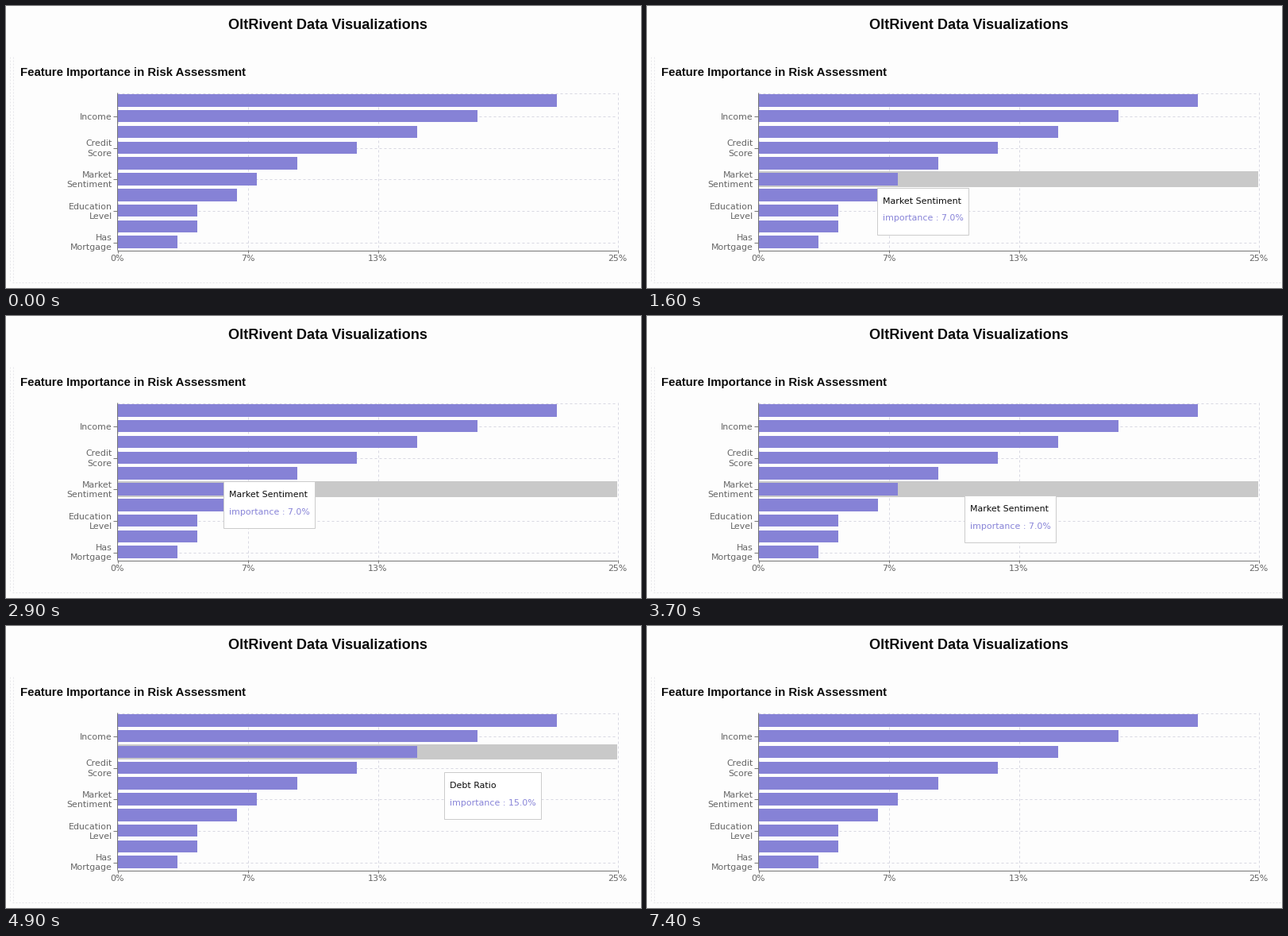
Write a matplotlib script that moves like this. It is 800 by 355 pixels and loops after 7.9 s.

```python
import matplotlib.pyplot as plt
import numpy as np
from matplotlib.animation import FuncAnimation
from matplotlib.patches import Rectangle

W, H, DPI = 800, 355, 100
STEP, FRAMES = 100, 79
LEFT, RIGHT, TOP, BOTTOM = 140, 770, 109, 307
BAND = (BOTTOM - TOP) / 10
TIP_H, LAG = 59, 0.4
SHOW, HIDE = 800, 7400

BG, BAR, CURSOR = "#fdfdfd", "#8682d6", "#c9c9c9"
GRID, BORDER, AXIS = "#d8d8e2", "#e6e6ea", "#777777"
INK, LABEL = "#0b0b0b", "#666666"

FEATURES = {
    "Loan Amount": 22, "Income": 18, "Debt Ratio": 15, "Credit Score": 12,
    "Savings Rate": 9, "Market Sentiment": 7, "Loan Term": 6,
    "Education Level": 4, "Age Group": 4, "Has Mortgage": 3,
}
NAMES = list(FEATURES)

# Pointer path: ms, x, height in rows
POINTER = np.array([
    (800, 460, 1.5), (1000, 440, 1.9), (1100, 319, 7.5), (1700, 243.5, 5.5),
    (2400, 243.5, 5.5), (2500, 249, 7.5), (2800, 265.5, 7.5),
    (2900, 271, 5.9), (4400, 543.5, 4.9), (5200, 543.5, 1.5),
]).T

fig = plt.figure(figsize=(W / DPI, H / DPI), dpi=DPI, facecolor=BG)
ax = fig.add_axes([0, 0, 1, 1])
ax.set_xlim(0, W)
ax.set_ylim(H, 0)
ax.axis("off")


def text(x, y, s, px=11, color=LABEL, ha="left", bold=False, z=5):
    return ax.text(x, y, s, fontsize=px * 72 / DPI, color=color, ha=ha,
                   va="baseline", zorder=z,
                   family="Liberation Sans" if bold else "DejaVu Sans",
                   weight="bold" if bold else "normal")


def line(x0, y0, x1, y1, color, dash=None, z=1):
    ax.plot([x0, x1], [y0, y1], color=color, lw=72 / DPI, zorder=z,
            ls=(0, dash) if dash else "-",
            solid_capstyle="butt", dash_capstyle="butt")


def box(x, y, w, h, color, z, edge="none"):
    return ax.add_patch(Rectangle((x, y), w, h, fc=color, ec=edge,
                                  lw=72 / DPI, zorder=z))


def center(row):
    return TOP + BAND * (row + 0.5)


def x_of(value):
    return LEFT + (RIGHT - LEFT) * value / 25


def draw_chart():
    text(405, 29, "OltRivent Data Visualizations", 18.1, INK, "center", True)
    text(17.5, 88, "Feature Importance in Risk Assessment", 15, INK,
         bold=True)

    # Card outline
    for x in (4.5, 8.5):
        line(x, 64, x, 347, BORDER, (2, 2))
    line(8, 347.5, W, 347.5, BORDER, (2, 2))

    dash = (3, 3)
    line(LEFT, TOP + 0.5, RIGHT, TOP + 0.5, GRID, dash)
    for value in (0, 6.5, 13, 25):
        x = round(x_of(value)) + 0.5
        line(x, TOP, x, BOTTOM, GRID, dash)
        line(x, BOTTOM, x, BOTTOM + 4, AXIS, z=4)
        text(x, 321, f"{int(value + 0.5)}%", ha="center")

    for row, (name, value) in enumerate(FEATURES.items()):
        y = center(row)
        box(LEFT, y - 7.8, x_of(value) - LEFT, 15.6, BAR, 3)
        if row % 2:
            tick = int(y) + 0.5
            line(LEFT, tick, RIGHT, tick, GRID, dash)
            line(LEFT - 5, tick, LEFT, tick, AXIS, z=4)
            words = name.split()
            y += 4.2 - 6.1 * (len(words) - 1)
            for k, word in enumerate(words):
                text(133.7, y + 12.2 * k, word, ha="right")

    line(LEFT - 0.5, TOP, LEFT - 0.5, BOTTOM, AXIS, z=4)
    line(LEFT, BOTTOM + 0.5, RIGHT, BOTTOM + 0.5, AXIS, z=4)


def pointer(t):
    """Pointer x and hovered row."""
    x, height = (np.interp(t, POINTER[0], p) for p in POINTER[1:])
    return x, int(height)


def tip_target(t):
    """Resting corner of the tooltip; it flips above when space runs out."""
    x, row = pointer(t)
    y = center(row) + 8
    if y + TIP_H > BOTTOM:
        y -= TIP_H + 16
    return np.array([x + 10, y])


def tip_corner(t):
    """The tooltip closes part of the gap to its target on each step."""
    pos = tip_target(SHOW)
    for s in range(SHOW + STEP, t + 1, STEP):
        pos = pos + LAG * (tip_target(s) - pos)
    return np.floor(pos) + 0.5


draw_chart()
band = box(LEFT, TOP, RIGHT - LEFT, BAND, CURSOR, 2)
tip = box(0, 0, 115, TIP_H, "#ffffff", 8, "#cccccc")
title = text(0, 0, "", color=INK, z=9)
detail = text(0, 0, "", color="#8884d8", z=9)
hover = (band, tip, title, detail)


def update(i):
    t = i * STEP
    visible = SHOW <= t < HIDE
    for part in hover:
        part.set_visible(visible)
    if visible:
        row = pointer(t)[1]
        value = FEATURES[NAMES[row]]
        x, y = tip_corner(t)
        band.set_y(TOP + BAND * row)
        tip.set_xy((x, y))
        tip.set_width(122 if value >= 10 else 115)
        title.set_text(NAMES[row])
        title.set_position((x + 7.5, y + 20.5))
        detail.set_text(f"importance : {value:.1f}%")
        detail.set_position((x + 7.5, y + 42))
    return hover


anim = FuncAnimation(fig, update, frames=FRAMES, interval=STEP, repeat=True,
                     repeat_delay=0, blit=False)
plt.show()
```
